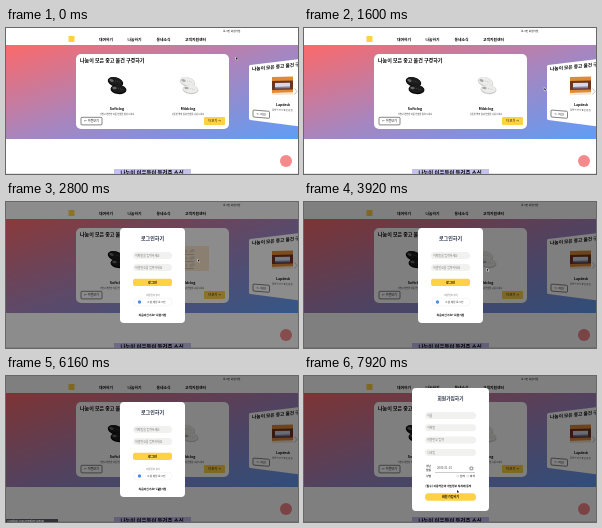
Animation of 292 by 146 pixels, one loop 8000 ms. Source, as an HTML page with a canvas:

```html
<!DOCTYPE html>
<html lang="ko">
<meta charset="utf-8">
<style>
html, body { margin: 0; width: 100%; height: 100%; overflow: hidden; background: #fff }
canvas { display: block; width: 292px; height: 146px }
</style>
<canvas id="stage"></canvas>
<script>
const LOOP = 8000, YELLOW = '#ffd145', INK = '#000';
const canvas = document.getElementById('stage'), c = canvas.getContext('2d');
const dpr = window.devicePixelRatio || 1;
canvas.width = 292 * dpr;
canvas.height = 146 * dpr;

const ramp = (t, a, b) => Math.min(1, Math.max(0, (t - a) / (b - a)));

function box(x, y, w, h, fill, r = 0, line) {
  c.beginPath();
  c.roundRect(x, y, w, h, r);
  if (fill) { c.fillStyle = fill; c.fill(); }
  if (line) { c.strokeStyle = line; c.lineWidth = .6; c.stroke(); }
}

function disc(x, y, rx, ry, fill, turn = 0) {
  c.beginPath();
  c.ellipse(x, y, rx, ry, turn, 0, 7);
  c.fillStyle = fill;
  c.fill();
}

function text(s, x, y, size, color = INK, weight = 500, align = 'left') {
  c.font = `${weight} ${size}px "Noto Sans CJK KR", "Noto Sans CJK", "Noto Sans CJK JP", sans-serif`;
  c.fillStyle = color;
  c.textAlign = align;
  c.textBaseline = 'middle';
  c.fillText(s, x, y);
}

const centered = (s, x, y, size, color, weight) => text(s, x, y, size, color, weight, 'center');

function sheared(y, slope, x, draw) {
  c.save();
  c.translate(x, y);
  c.transform(1, slope, 0, 1, 0, 0);
  draw();
  c.restore();
}

function clogs(x, y, body, hole, edge) {
  for (const [dx, dy, turn] of [[-1.5, -4, .3], [1.5, 3.5, .1]]) {
    disc(x + dx, y + dy, 8, 4.6, edge, turn);
    disc(x + dx, y + dy - .5, 7.4, 4, body, turn);
    disc(x + dx - 4, y + dy - 1.5, 2.2, 1.3, hole, turn);
    for (let i = 0; i < 3; i++) disc(x + dx + i * 1.8, y + dy - 1 + i * .5, .4, .4, hole);
  }
}

function header() {
  box(0, 0, 292, 17, '#fff');
  box(62.5, 8, 6, 6, YELLOW);
  text('로그인 회원가입', 217, 3, 2.6);
  const items = [[93, '대여하기'], [121.5, '나눔하기'], [150.5, '동네소식'], [179, '고객지원센터']];
  for (const [x, label] of items) text(label, x, 12, 3.8, INK, 700);
}

function hero() {
  const g = c.createLinearGradient(118.6, -21.1, 173.4, 149.1);
  g.addColorStop(0, '#fb696a');
  g.addColorStop(.5, '#a985bd');
  g.addColorStop(1, '#5f9df6');
  box(0, 17, 292, 94, g);
}

function mainCard(hover) {
  box(70, 26, 153, 75, '#fff', 5);
  text('나눔이 모은 중고 물건 구경하기', 74, 32.5, 5, INK, 700);
  clogs(111, 58, '#1c1c1c', '#666', '#000');
  clogs(183, 58, '#ececea', '#aaa', '#c8c8c6');
  if (hover) {
    c.globalAlpha = hover;
    box(162, 44, 41, 25, '#fde6ce');
    for (let i = 0; i < 3; i++) {
      disc(179, 49 + i * 7, 2.8, 1.7, '#d9d0c6', .3);
      disc(186, 49 + i * 7, 2.8, 1.7, '#d9d0c6', -.3);
      box(177, 52 + i * 7, 11, .5, '#a08c7c');
    }
    c.globalAlpha = 1;
  }
  centered('Softclog', 111, 80.5, 3.5, INK, 700);
  centered('Mildclog', 182, 80.5, 3.5, INK, 700);
  centered('가볍고 편안한 여름 신발을 빌려 드려요', 111, 86, 2.2, '#333');
  centered('산뜻한 색의 실내 신발을 나눠 드려요', 182, 86, 2.2, '#333');
  box(75, 89.3, 21, 7.6, '#fff', 1, '#333');
  centered('← 이전보기', 85.5, 93, 3);
  box(198, 89, 21, 8, YELLOW, 1);
  centered('더 보기 →', 208.5, 93, 3);
}

function sideCard() {
  c.beginPath();
  c.moveTo(244.5, 38.5);
  c.lineTo(294, 32.5);
  c.lineTo(294, 97);
  c.lineTo(244.5, 90.5);
  c.closePath();
  c.fillStyle = c.strokeStyle = '#fff';
  c.lineJoin = 'round';
  c.lineWidth = 3;
  c.fill();
  c.stroke();
  sheared(41, -.1, 246, () => text('나눔이 모은 중고 물건 구경', 0, 0, 4.7, INK, 700));
  sheared(49, -.02, 266, () => {
    box(0, 0, 21, 16, '#e08a34');
    box(0, 4, 21, 9, '#6b3524');
    box(3, 6, 15, 4, '#d5d9ea');
    box(3, 10, 15, 1.5, '#7384b4');
    box(0, 16, 21, 2, '#f3e3d0');
  });
  centered('Lapdesk', 277, 77, 3.4, INK, 700);
  sheared(81.5, .04, 266, () => text('집에서 쓰기 좋은 받침', 0, 0, 2.3, '#333'));
  sheared(82, .08, 247, () => {
    box(0, 0, 16.5, 7, '#fff', 1, '#333');
    centered('← 이전', 8.2, 3.5, 3);
  });
  c.beginPath();
  c.moveTo(288.5, 60.5);
  c.lineTo(291, 63.5);
  c.lineTo(288.5, 66.5);
  c.strokeStyle = '#aaa';
  c.lineWidth = .7;
  c.stroke();
}

function page(hover) {
  box(0, 0, 292, 146, '#fff');
  hero();
  header();
  mainCard(hover);
  sideCard();
  box(0, 145, 292, .6, '#c9c9d4');
  box(108, 141, 77, 5, '#c5c0f2');
  centered('나눔이 이웃들이 들려준 소식', 146, 144.5, 5.4, INK, 700);
  disc(280, 133, 6, 6, '#f58a8d');
}

function field(x, y, w, label) {
  box(x, y, w, 7, '#f1f1ef', 3.5);
  text(label, x + 2.2, y + 3.6, 2.9, '#777');
}

function loginModal(t) {
  box(114, 26, 65, 95, '#fff', 4);
  centered('로그인하기', 146.5, 36, 5, '#222c44', 700);
  field(127, 50, 39, '이메일을 입력하세요');
  field(127, 62, 39, '비밀번호를 입력하세요');
  box(127, 76.7, 39, 7.3, t > 4320 && t < 4900 ? '#f4c52c' : YELLOW, 2);
  centered('로그인', 146.5, 80.4, 3.2, INK, 600);
  centered('비밀번호 찾기', 147, 93, 2.4, '#777');
  box(128, 96.3, 38, 7.4, '#fff', 3.5, '#f0f0f0');
  disc(133.5, 100, 1.7, 1.7, '#4c8bea');
  text('소셜 계정 로그인', 141, 100, 2.7, '#333');
  centered('처음이신가요? 회원가입', 146.5, 112.7, 2.8, INK, 700);
}

function signupModal() {
  box(108, 12, 77, 123, '#fff', 4);
  centered('회원가입하기', 146.5, 22, 4.7, '#222c44', 700);
  ['이름', '이메일', '비밀번호 입력', '닉네임'].forEach((s, i) => field(121, 36 + i * 12.3, 51, s));
  text('생년', 122, 90, 2.8);
  text('월일', 122, 94, 2.8);
  text('2000-01-01', 133, 92.3, 2.9, '#444');
  box(131, 96, 40, .4, '#999');
  box(166, 91, 2.8, 2.8, null, .3, '#444');
  text('성별', 122, 100.3, 2.8);
  text('○ 남자  ○ 여자', 171, 100.3, 2.8, INK, 400, 'right');
  text('[필수] 이용약관과 개인정보 처리에 동의', 121.5, 110, 2.8, INK, 600);
  box(121, 117.3, 51, 7.5, YELLOW, 3.5);
  centered('회원 가입하기', 146.5, 121.1, 3, INK, 600);
}

// time, x, y
const PATH = [
  [0, 230, 29], [160, 230, 29], [720, 274, 54], [800, 277, 56], [1120, 277, 57],
  [1520, 263, 60], [1760, 196, 59], [2160, 192, 57], [3760, 192, 57], [4160, 169, 80],
  [4480, 160, 83], [4800, 158, 84], [4960, 157, 88], [5360, 156, 97], [5760, 155, 101],
  [6160, 152, 112], [6560, 153, 113], [7120, 153, 111], [7200, 153, 113], [7920, 153, 114]
];

function cursor(t) {
  let i = PATH.findIndex(p => p[0] > t);
  if (i < 0) i = PATH.length - 1;
  const a = PATH[i - 1], b = PATH[i], k = ramp(t, a[0], b[0]);
  c.save();
  c.translate(a[1] + (b[1] - a[1]) * k, a[2] + (b[2] - a[2]) * k);
  c.beginPath();
  c.moveTo(0, 0);
  for (const [x, y] of [[0, 2.8], [.7, 2.2], [1.2, 3.2], [1.6, 3], [1.2, 2], [2, 2]]) c.lineTo(x, y);
  c.closePath();
  c.strokeStyle = '#fff';
  c.lineWidth = .9;
  c.stroke();
  c.fillStyle = '#111';
  c.fill();
  c.restore();
}

function statusBar(t) {
  c.globalAlpha = ramp(t, 5900, 6100) * (1 - ramp(t, 6560, 6720));
  box(0, 143, 52, 3, '#303134');
  text('localhost:3000/member/signup', 1.5, 144.6, 2.5, '#ddd');
  c.globalAlpha = 1;
}

function draw(t) {
  c.setTransform(dpr, 0, 0, dpr, 0, 0);
  page(ramp(t, 1760, 2100) * (1 - ramp(t, 3040, 3280)));
  if (t >= 2800) {
    box(0, 0, 292, 146, `rgba(0,0,0,${.45 + .05 * ramp(t, 2800, 2960)})`);
    if (t < 7760) loginModal(t);
    if (t >= 7680) {
      c.globalAlpha = t < 7760 ? .7 : 1;
      signupModal();
      c.globalAlpha = 1;
    }
    statusBar(t);
  }
  cursor(t);
}

const start = performance.now();
function tick() {
  draw((performance.now() - start) % LOOP);
  requestAnimationFrame(tick);
}
tick();
</script>
</html>
```
